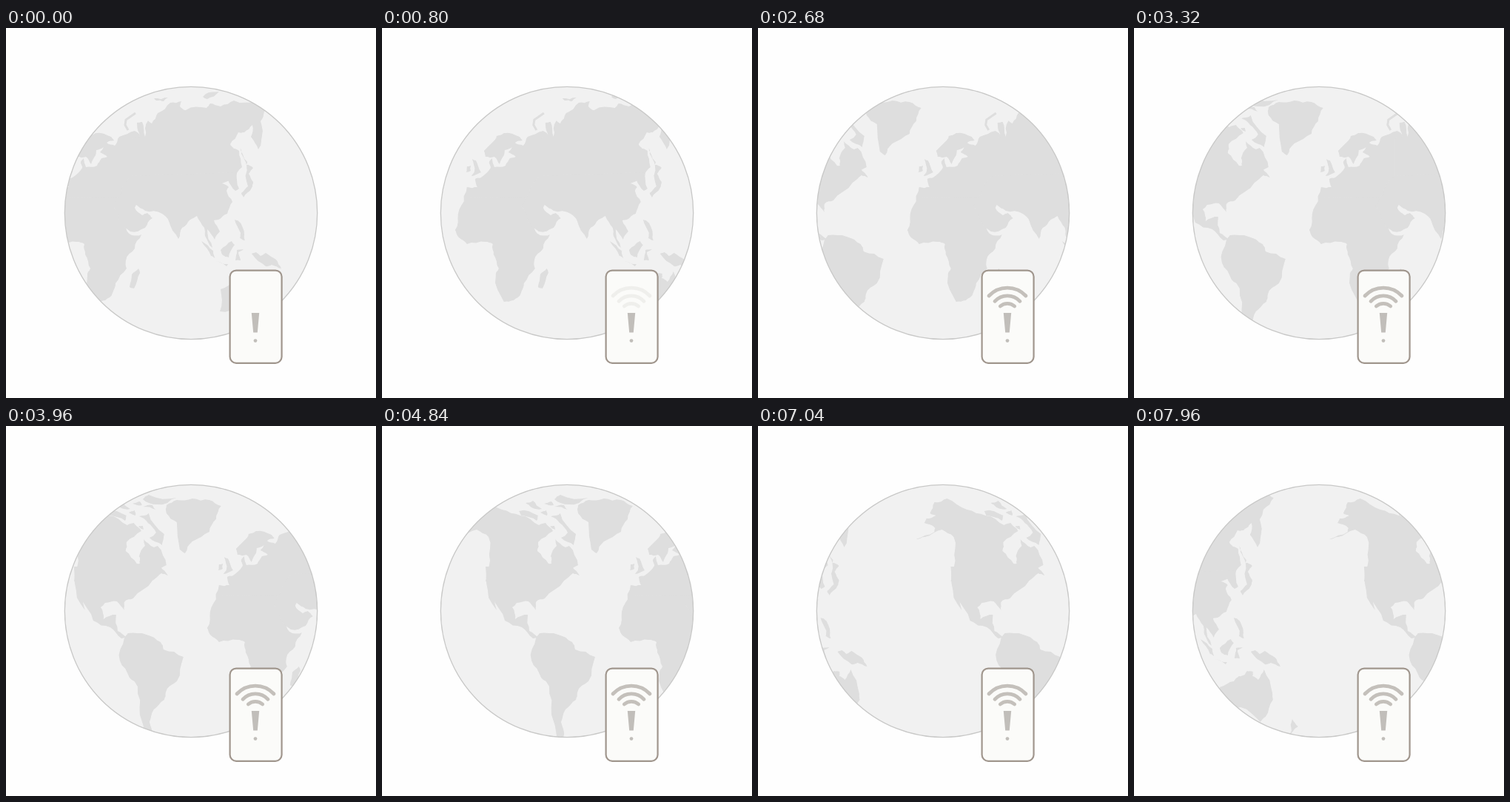
Recreate the animation shown at these times as an HTML page. Size 500 by 500 pixels, loop 8 s.

```html
<!DOCTYPE html>
<html lang="en">
<head>
<meta charset="utf-8">
<title>Globe and phone</title>
<style>
  html, body { margin: 0; width: 100%; height: 100%; overflow: hidden; background: #fefefe; }
  svg { display: block; width: 100vw; height: 100vh; }
</style>
</head>
<body>
<svg viewBox="0 0 500 500">
  <defs>
    <clipPath id="disc"><circle cx="250" cy="250" r="170.5"/></clipPath>
    <g id="land" fill="#dedede">
      <g transform="translate(-44)">
        <!-- Europe -->
        <polygon points="112,240 115,215 129,215 126,204 134,202 147,189 145,181 149,176 152,188 167,186 173,176 181,174 171,168 176,161 166,165 165,172 159,184 152,174 140,174 138,166 150,154 155,146 165,142 186,147 190,152 180,155 191,159 197,147 218,139 236,150 236,236 190,243 150,262"/>
        <!-- Africa -->
        <polygon points="115,229 200,228 189,242 203,266 214,280 227,279 218,298 206,314 207,325 192,345 188,358 178,368 165,370 154,335 158,325 151,306 150,292 140,289 115,292 104,283 99,273 103,251"/>
        <!-- Britain, Ireland, Madagascar -->
        <polygon points="122,177 127,179 134,195 121,200 125,194"/>
        <polygon points="115,187 120,186 120,193 114,195"/>
        <polygon points="223,325 225,331 217,352 211,350 214,333"/>
      </g>
      <!-- Siberia -->
      <polygon points="170,150 181,147 177,128 184,127 188,147 192,125 197,129 205,115 222,101 237,99 235,106 243,111 271,108 276,102 290,106 308,98 340,98 352,93 363,97 349,113 344,126 345,152 341,164 331,147 333,131 322,141 314,141 303,157 308,163 315,166 319,188 310,203 240,230 170,230"/>
      <!-- South Asia -->
      <polygon points="170,200 312,195 315,217 310,220 300,205 291,210 301,215 298,220 306,235 299,251 287,259 281,260 289,275 282,286 272,272 279,297 269,281 268,270 258,254 249,259 238,270 233,285 220,261 211,251 188,247 176,239 174,243 184,253 191,250 198,257 188,270 168,275 144,240 155,225"/>
      <!-- Islands of the north -->
      <polyline points="175,115 162,124 161,131 165,138" fill="none" stroke="#dedede" stroke-width="3"/>
      <polygon points="200,95 219,94 213,99 203,98"/>
      <polygon points="266,93 270,89 288,86 272,96"/>
      <!-- Sakhalin, Japan -->
      <polygon points="316,160 326,181 325,185 318,170"/>
      <polygon points="325,185 334,189 328,197 334,208 332,216 321,229 318,223 327,214"/>
      <!-- Philippines, Indonesia -->
      <polygon points="309,259 313,260 322,280 323,287 316,284 317,277"/>
      <polygon points="264,288 280,301 284,313 277,308"/>
      <polygon points="283,315 300,319 298,322"/>
      <polygon points="290,300 305,288 309,293 301,310 293,307"/>
      <polygon points="312,300 321,299 314,303 317,314 310,314"/>
      <!-- New Guinea -->
      <polygon points="332,305 338,303 344,308 351,304 365,313 372,325 359,320 351,322"/>
      <!-- Australia, New Zealand -->
      <g transform="translate(174)">
        <polygon points="116,353 135,345 142,338 150,336 153,331 161,332 160,338 168,343 176,329 187,360 188,370 178,393 171,400 144,380 115,383"/>
        <polygon points="214,396 222,406 208,422 213,412"/>
      </g>
      <g transform="translate(-333)">
        <!-- Alaska, Canada -->
        <polygon points="161,153 186,143 187,138 172,131 175,125 188,121 180,118 186,103 203,98 230,113 255,121 280,134 289,131 299,142 279,157 278,169 293,186 297,186 296,176 304,162 302,153 316,164 321,162 333,188 315,196 327,194 325,200 208,210 214,182 212,150 196,140 173,150"/>
        <!-- United States, Mexico -->
        <polygon points="208,190 325,190 335,202 326,199 314,209 288,233 276,238 276,249 266,237 250,239 244,245 248,261 265,255 267,277 280,287 272,287 257,272 234,263 218,230 223,249 209,212"/>
      </g>
      <g transform="translate(-265)">
        <!-- Baffin and its neighbours -->
        <polygon points="228,122 241,118 262,146 259,161 242,151 251,144 240,131"/>
        <polygon points="185,115 211,121 209,128 188,121"/>
        <polygon points="194,104 204,101 216,112 202,110"/>
        <polygon points="214,117 222,114 223,121"/>
        <polygon points="219,105 229,102 232,107"/>
        <polygon points="233,109 246,107 251,113"/>
        <polygon points="227,136 233,135 234,140"/>
        <polygon points="233,99 241,93 279,97 252,106"/>
        <!-- South America -->
        <polygon points="208,287 213,280 238,282 257,292 261,302 288,312 279,345 264,360 262,370 248,383 242,400 245,421 236,419 229,390 226,352 215,340 202,317"/>
      </g>
      <!-- Greenland -->
      <polygon transform="translate(-217)" points="217,107 231,100 252,98 275,100 291,108 284,126 275,143 252,156 242,172 235,167 231,130 217,118"/>
    </g>
  </defs>
  <circle cx="250" cy="250" r="170.5" fill="#f1f1f1"/>
  <g clip-path="url(#disc)">
    <use id="near" href="#land"/>
    <use id="far" href="#land"/>
  </g>
  <circle cx="250" cy="250" r="170.7" fill="none" stroke="#c8c8c7" stroke-width="1.3"/>
  <rect x="302.6" y="327.6" width="70" height="125.2" rx="8.5" fill="#fbfbf9" stroke="#a0968d" stroke-width="2.2"/>
  <g id="wifi" fill="none" stroke="#c4c0bb" stroke-width="4.8" stroke-linecap="round">
    <path d="M312 362A34 34 0 0 1 362 362"/>
    <path d="M320 369.3A23 23 0 0 1 354 369.3"/>
    <path d="M327.3 376A14.5 14.5 0 0 1 346.7 376"/>
  </g>
  <g fill="#c1beba">
    <path d="M331.8 385H342.2L339.8 411.5H334.2Z"/>
    <circle cx="337" cy="422.6" r="2.4"/>
  </g>
</svg>
<script>
const LOOP = 8000;     // ms
const SPEED = 0.05475; // px per ms
const WRAP = 610;      // width of the flat map

const $ = id => document.getElementById(id);
const clamp = v => Math.min(1, Math.max(0, v));

let seed = 7;
const random = () => (seed = seed * 16807 % 2147483647) / 2147483647;

// Split each edge at its middle and push it sideways for a ragged coast.
function roughen(points) {
  return points.flatMap(([x, y], i) => {
    const [u, v] = points[(i + 1) % points.length];
    const dx = u - x, dy = v - y, length = Math.hypot(dx, dy);
    if (length < 3 || length > 45) return [[x, y]];
    const k = (random() - 0.5) * 0.22;
    return [[x, y], [(x + u) / 2 - dy * k, (y + v) / 2 + dx * k]];
  });
}

for (const coast of document.querySelectorAll('#land polygon')) {
  const corners = Array.from(coast.points, p => [p.x, p.y]);
  coast.setAttribute('points', roughen(roughen(corners)).join(' '));
}

function draw(t) {
  const x = t * SPEED;
  $('near').setAttribute('x', x);
  $('far').setAttribute('x', x - WRAP);
  $('wifi').setAttribute('opacity', clamp((t - 500) / 1500));
}

let start;
function tick(now) {
  start ??= now;
  draw((now - start) % LOOP);
  requestAnimationFrame(tick);
}
draw(0);
requestAnimationFrame(tick);
</script>
</body>
</html>
```
